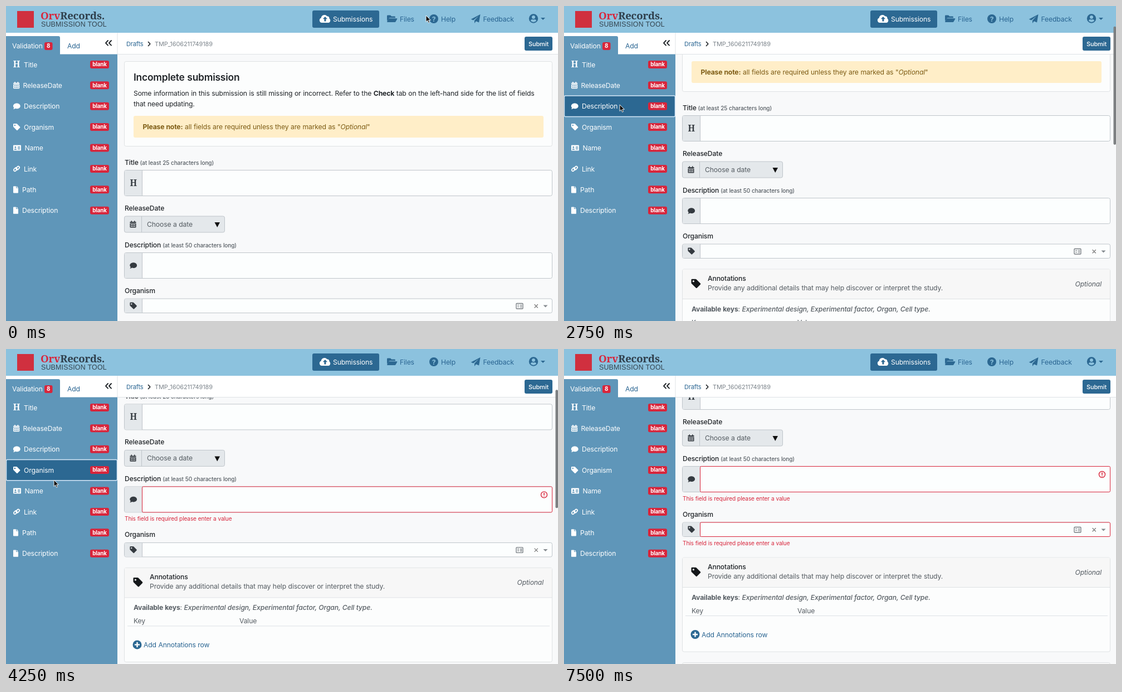
These frames come from a looping animation (991 by 565 pixels, 8 s). An HTML page:

```html
<!DOCTYPE html>
<html lang="en">
<head>
<meta charset="utf-8">
<title>Submission form validation</title>
<style>
  html, body { margin: 0; width: 100%; height: 100%; overflow: hidden; background: #f8f9fa; }
  svg { display: block; width: 991px; height: 565px; }
  text { font-family: Inter, "Open Sans", sans-serif; font-size: 12.2px; letter-spacing: -.012em; word-spacing: .025em; fill: #212529; }
  .w { fill: #fff; }
  .link { fill: #2a6592; }
  .grey { fill: #565d63; }
  .medium { font-weight: 500; }
  .bold { font-weight: 700; }
  .em { font-style: italic; }
  .small { font-size: 10.1px; }
  .mid { font-size: 11px; }
  .title { font-size: 17.4px; font-weight: 600; }
  .badge { font-size: 9.8px; font-weight: 700; fill: #fff; }
  .slab { font-family: "Noto Serif", serif; font-weight: 700; }
  .err { fill: #d8253b; }
</style>
</head>
<body>
<svg id="stage" viewBox="0 0 991 565" xmlns="http://www.w3.org/2000/svg"></svg>
<script>
const LOOP = 8000, STEP = 250, ROW = 37.4, ROW_TOP = 86.2, ERROR_H = 18;
const BLUE = '#2c6892', SIDE = '#5f96b9', RED = '#d8253b', LINE = '#bfc5ca', ADDON = '#e4e8eb', FIELD = '#fcfefe';

const rect = (x, y, w, h, fill, more = '') =>
  `<rect x="${x}" y="${y}" width="${w}" height="${h}" fill="${fill}" ${more}/>`;
const text = (x, y, s, cls = '', more = '') => `<text x="${x}" y="${y}" class="${cls}" ${more}>${s}</text>`;
const span = (s, cls) => `<tspan class="${cls}">${s}</tspan>`;
const path = (d, more) => `<path d="${d}" ${more}/>`;
const group = (id, body) => `<g id="${id}">${body}</g>`;
const stroke = (color, w) => `fill="none" stroke="${color}" stroke-width="${w}" stroke-linecap="round" stroke-linejoin="round"`;
const disc = r => `M${-r} 0a${r} ${r} 0 1 0 ${2 * r} 0a${r} ${r} 0 1 0 ${-2 * r} 0z`;
const box = (x, y, w, h) => `M${x} ${y}h${w}v${h}h${-w}z`;

// Icon outlines centred on the origin; inner contours are holes.
const ICONS = {
  calendar: 'M-5.5 -4.5h2v-1.8h1.6v1.8h3.8v-1.8h1.6v1.8h2v2h-11zM-5.5 -1.7h11v6.6q0 1 -1 1h-9q-1 0 -1 -1z'
    + [-3.8, -.9, 2].map(x => box(x, -.4, 1.8, 1.8) + box(x, 2.6, 1.8, 1.8)).join(''),
  comment: 'M0 -5.2c3.7 0 6.4 2.2 6.4 4.9s-2.7 4.8 -6.4 4.8q-1.4 0 -2.6 -.4q-1.6 1.2 -3.8 1.2q1.3 -1.2 1.5 -2.5q-1.5 -1.4 -1.5 -3.1c0 -2.7 2.7 -4.9 6.4 -4.9z',
  tag: 'M-6.3 -5.2q0 -1 1 -1h4.7q.6 0 1 .4l5.4 5.4q.8 .8 0 1.6l-4.4 4.4q-.8 .8 -1.6 0l-5.7 -5.6q-.4 -.4 -.4 -1zM-4.6 -3.2a1.2 1.2 0 1 0 2.4 0a1.2 1.2 0 1 0 -2.4 0z',
  card: 'M-7 -4q0 -1 1 -1h12q1 0 1 1v8q0 1 -1 1h-12q-1 0 -1 -1z' + box(1, -2.4, 4.3, 1.1) + box(1, -.2, 4.3, 1.1)
    + box(1, 2, 4.3, 1.1) + 'M-4.6 -1.2a1.5 1.5 0 1 0 3 0a1.5 1.5 0 1 0 -3 0zM-5.5 3.3q0 -2 2.4 -2t2.4 2z',
  file: 'M-4.5 -5.3q0 -.8 .8 -.8h4.2v3.4h4v8q0 .8 -.8 .8h-7.4q-.8 0 -.8 -.8zM1.4 -6.1l3.1 2.6h-3.1z',
  cloud: 'M-6 7a4.4 4.4 0 0 1 -1.3 -8.5a6 6 0 0 1 10.8 -3.1a3.6 3.6 0 0 1 4 4.2a4.2 4.2 0 0 1 -1 7.4zM-1.6 4.4h3v-4.2h2.6l-4.1 -4.1l-4.1 4.1h2.6z',
  folder: 'M-9 4v-9q0 -1.4 1.4 -1.4h4.7l2 2h5.4q1.4 0 1.4 1.4v1.2h-9.6q-1.6 0 -2.4 1.4zM-5.8 -.8h14.6q1 0 .5 1l-2.7 4.9q-.5 .9 -1.5 .9h-13.4q-1 0 -.5 -1l2.1 -4.8q.4 -1 .9 -1z',
  plane: 'M8.5 -8l-2.4 14.5l-5.3 -2.2l-2.8 3.8v-5l7.6 -8.4l-9.6 7.8l-4.3 -1.8z',
  user: disc(8.2) + 'M-3 -2.6a3 3 0 1 0 6 0a3 3 0 1 0 -6 0zM-5.2 3.8a6.4 6.4 0 0 0 10.4 0q-.8 -2.2 -3 -2.2q-2.2 .9 -4.4 0q-2.2 0 -3 2.2z',
  plus: disc(8) + 'M-1.2 -4.6h2.4v3.4h3.4v2.4h-3.4v3.4h-2.4v-3.4h-3.4v-2.4h3.4z',
};

function icon(name, x, y, color, scale = 1) {
  if (name === 'heading')
    return text(x, y + 5.5, 'H', 'slab', `text-anchor="middle" style="font-size:15.4px;fill:${color}"`);
  const at = `transform="translate(${x} ${y}) scale(${scale})"`;
  if (name === 'link') {
    const loop = (cx, cy) => `<rect x="${cx - 3.4}" y="${cy - 2.1}" width="6.8" height="4.2" rx="2.1"/>`;
    return `<g ${at}><g transform="rotate(-45)" ${stroke(color, 1.7)}>${loop(-2.4, -.6)}${loop(2.4, .6)}</g></g>`;
  }
  return path(ICONS[name], `${at} fill="${color}" fill-rule="evenodd"`);
}
const caret = (x, y, color, w = 4) => path(`M${x - w} ${y}h${2 * w}l${-w} ${w}z`, `fill="${color}"`);

function header() {
  return rect(0, 0, 991, 48, '#8cc2de')
    + rect(20, 9, 30, 30, '#d0303f')
    + text(62, 24, span('Orv', 'err') + 'Records.', 'slab', 'style="font-size:18.7px;fill:#2f3f4c"')
    + text(63, 37, 'SUBMISSION TOOL', '', 'style="font:12.4px Liberation Sans,sans-serif;letter-spacing:.2px;fill:#34444f"')
    + rect(550, 8, 120, 31, BLUE, 'rx="3"')
    + icon('cloud', 573, 23, '#fff') + text(587, 28, 'Submissions', 'w')
    + icon('folder', 693, 23, BLUE) + text(707, 28, 'Files', 'link')
    + path(disc(8), `transform="translate(768 23)" fill="${BLUE}"`)
    + text(768, 27.5, '?', 'bold', 'text-anchor="middle" style="fill:#8cc2de"') + text(781, 28, 'Help', 'link')
    + icon('plane', 843, 23, BLUE) + text(856.5, 28, 'Feedback', 'link')
    + icon('user', 947, 22.5, BLUE) + caret(964, 21, BLUE);
}

// Icon, icon centre, label, label start
const CHECKS = [['heading', 19, 'Title', 32], ['calendar', 18.7, 'ReleaseDate', 30.5], ['comment', 19.3, 'Description', 32],
  ['tag', 19.3, 'Organism', 32], ['card', 20, 'Name', 33.5], ['link', 19, 'Link', 32],
  ['file', 17.5, 'Path', 29], ['file', 17.5, 'Description', 29]];

function sidebar() {
  const rows = CHECKS.map(([name, iconX, label, x], i) => {
    const y = ROW_TOP + ROW * (i + .5);
    return icon(name, iconX, y, '#fff') + text(x, y + 4.6, label, 'w')
      + rect(151, y - 7, 34, 14, RED, 'rx="3"') + text(168, y + 3.3, 'blank', 'badge', 'text-anchor="middle"');
  }).join('');
  return rect(0, 48, 200, 39, '#fff') + path('M0 54h94q3 0 3 3v29.5h103v478.5h-200z', `fill="${SIDE}"`)
    + text(11, 75.5, 'Validation', 'w') + rect(69, 65, 14.5, 14, RED, 'rx="3"')
    + text(76.2, 75.4, '8', 'badge', 'text-anchor="middle"') + text(110, 75.5, 'Add', 'link')
    + path('M183 62l-4 4.3l4 4.3M189 62l-4 4.3l4 4.3', stroke('#1d2226', 1.9))
    + rect(0, 0, 200, ROW, BLUE, 'id="hover"')
    + rect(.5, 0, 199, ROW, BLUE, 'id="press" stroke="#d5e8f8" stroke-width="1.5" rx="2"') + rows;
}

function toolbar() {
  return rect(200, 48, 791, 38.5, '#fff') + rect(199.5, 48, 1, 38, '#dfe3e6') + rect(200, 86, 791, 1, '#dee2e6')
    + text(216, 72, 'Drafts', 'mid link') + path('M255.5 64.5l3.3 3.5l-3.3 3.5', stroke('#212529', 1.7))
    + text(267, 72, 'TMP_1606211749189', 'mid', 'style="fill:#7d858c"')
    + rect(931, 55, 50, 25, BLUE, 'rx="3"') + text(956, 72, 'Submit', 'mid w medium', 'text-anchor="middle"');
}

const label = (y, s, hint = '') => text(213, y, s + (hint && span(` (${hint})`, 'small grey')), 'medium');
const errorText = y => text(213, y, 'This field is required please enter a value', 'small err');

function input(y, h, name, id = '') {
  const frame = more => rect(244.5, y, 736, h, FIELD, `rx="2" ${more}`);
  return rect(212.5, y, 768, h, FIELD, `stroke="${LINE}" rx="3"`)
    + rect(213, y + .5, 31.5, h - 1, ADDON, 'rx="2"') + rect(244, y, 1, h, LINE)
    + icon(name, 228.7, y + h / 2, '#343a40')
    + (id && `<g id="${id}Error">${frame(`stroke="${RED}"`)}</g>`
      + group(id + 'Focus', frame('stroke="#b8dafc" stroke-width="5"') + frame('stroke="#80bdff" stroke-width="1.2"')));
}

function form() {
  const intro = rect(212.5, 99.5, 768, 152, '#fcfdfd', 'stroke="#dfe2e4" rx="3"')
    + text(229, 134, 'Incomplete submission', 'title')
    + text(229, 161, `Some information in this submission is still missing or incorrect. Refer to the ${span('Check', 'bold')} tab on the left-hand side for the list of fields`)
    + text(229, 180, 'that need updating.') + rect(229, 197, 736, 39, '#ffeec8', 'rx="3"')
    + text(245.5, 221, `${span('Please note:', 'bold')} all fields are required unless they are marked as "${span('Optional', 'em')}"`, '', 'style="fill:#7d5c14"');
  const basics = label(285, 'Title', 'at least 25 characters long') + input(294.5, 46, 'heading')
    + label(367, 'ReleaseDate') + rect(212.5, 377, 180, 29, ADDON, `stroke="${LINE}" rx="3"`)
    + rect(243, 377, 1, 29, LINE) + icon('calendar', 228, 391.5, '#343a40')
    + text(253, 396, 'Choose a date', 'grey') + path('M374.5 388h9.5l-4.75 9z', 'fill="#111"')
    + label(433, 'Description', 'at least 50 characters long') + input(442.5, 46, 'comment', 'desc')
    + group('descNote', errorText(503.5)
      + path(disc(5.5), `transform="translate(966 457)" ${stroke(RED, 1.4)}`)
      + path('M966 454v3.4M966 459.8v.1', stroke(RED, 1.6)));
  const organism = label(515, 'Organism') + input(525, 25.5, 'tag', 'org')
    + rect(916, 533.5, 12, 9.5, 'none', 'stroke="#757b80" stroke-width="1.3" rx="1"')
    + path('M918.5 536.5h2.5M918.5 539.5h2.5M923.5 536.2h2.5M923.5 538.2h2.5M923.5 540.2h2.5', stroke('#757b80', 1.1))
    + path('M949 535.5l5.5 5.5m0 -5.5l-5.5 5.5', stroke('#777', 1.2)) + caret(968.5, 536.5, '#858b90')
    + group('orgNote', errorText(566));
  const notes = rect(212.5, 570, 768, 169, '#fcfdfd', 'stroke="#dfe2e4" rx="3"')
    + rect(213, 570.5, 767, 52.5, '#f7f7f7') + rect(213, 623, 767, 1, '#dfe2e4')
    + icon('tag', 237, 596, '#15181a', 1.35) + text(258, 591, 'Annotations', 'medium')
    + text(258, 608, 'Provide any additional details that may help discover or interpret the study.', 'grey')
    + text(965, 601, 'Optional', 'em grey', 'text-anchor="end"')
    + text(229, 646, `${span('Available keys', 'bold')}: ${span('Experimental design, Experimental factor, Organ, Cell type.', 'em medium')}`, 'grey')
    + text(229, 669.5, 'Key', 'grey') + text(419, 669.5, 'Value', 'grey') + rect(218, 674, 758, 1, '#dee2e6')
    + icon('plus', 235.5, 708, BLUE) + text(247, 713, 'Add Annotations row', 'link')
    + rect(212.5, 758.5, 768, 100, '#f7f7f7', 'stroke="#dfe2e4" rx="3"');
  return intro + basics + group('organism', organism) + group('annotations', notes);
}

document.getElementById('stage').innerHTML =
  '<clipPath id="view"><rect x="200" y="87" width="791" height="478"/></clipPath>'
  + rect(0, 0, 991, 565, '#f8f9fa')
  + `<g clip-path="url(#view)">${group('form', form())}</g>`
  + header() + sidebar() + toolbar()
  + rect(986.5, 0, 4.5, 212, '#7c7f81', 'id="thumb" rx="2"')
  + path('M0 0v11.5l2.7 -2.5l1.9 4.3l2 -.9l-1.9 -4.1h3.7z',
    'id="pointer" fill="#111" stroke="#fff" stroke-width=".9" stroke-linejoin="round"');

const $ = id => document.getElementById(id);
const show = (id, on) => $(id).setAttribute('visibility', on ? 'visible' : 'hidden');
const move = (id, x, y) => $(id).setAttribute('transform', `translate(${x} ${y})`);
const latest = (track, t) => track.filter(([start]) => start <= t).pop();
const within = (t, from, to) => t >= from && t < to;

// Each entry: start time, x, y
const POINTER = [[0, 754, 17], [250, 640, 42], [500, 425, 95], [750, 235, 150], [1000, 131, 185], [1250, 117.5, 181],
  [1500, 110, 158], [1750, 99, 147], [2000, 97, 159], [2250, 100, 177], [3500, 124.5, 282], [3750, 110, 257],
  [4000, 88, 235], [4250, 86, 235], [5000, 160, 262], [5250, 330, 288], [5500, 415, 288], [5750, 422, 285],
  [6000, 395, 347], [6250, 370, 355], [6500, 348, 359]];
const SCROLL = [[0, 0], [2750, 98], [4000, 130], [4250, 195.6], [4500, 232]];

function render(ms) {
  const t = Math.floor(ms % LOOP / STEP) * STEP;
  const [, x, y] = latest(POINTER, t), scroll = latest(SCROLL, t)[1];
  const row = Math.floor((y - ROW_TOP) / ROW);
  const pressed = within(t, 2750, 3000) ? 2 : within(t, 4000, 4500) ? 3 : -1;
  const descError = t >= 4000, orgError = t >= 5500;

  move('pointer', x, y);
  show('pointer', t < 7000);
  show('hover', x < 200 && row >= 0 && row < CHECKS.length);
  move('hover', 0, ROW_TOP + ROW * row);
  show('press', pressed >= 0);
  move('press', 0, ROW_TOP + ROW * pressed);

  move('form', 0, -scroll);
  move('organism', 0, descError ? ERROR_H : 0);
  move('annotations', 0, ERROR_H * (descError + orgError));
  show('thumb', within(t, 2750, 3500) || within(t, 4000, 5000));
  move('thumb', 0, scroll * .375);

  show('descFocus', within(t, 3000, 4000));
  show('orgFocus', within(t, 4500, 5500));
  for (const part of ['Error', 'Note']) {
    show('desc' + part, descError);
    show('org' + part, orgError);
  }
}

const start = performance.now();
(function tick() {
  render(performance.now() - start);
  requestAnimationFrame(tick);
})();
</script>
</body>
</html>
```
